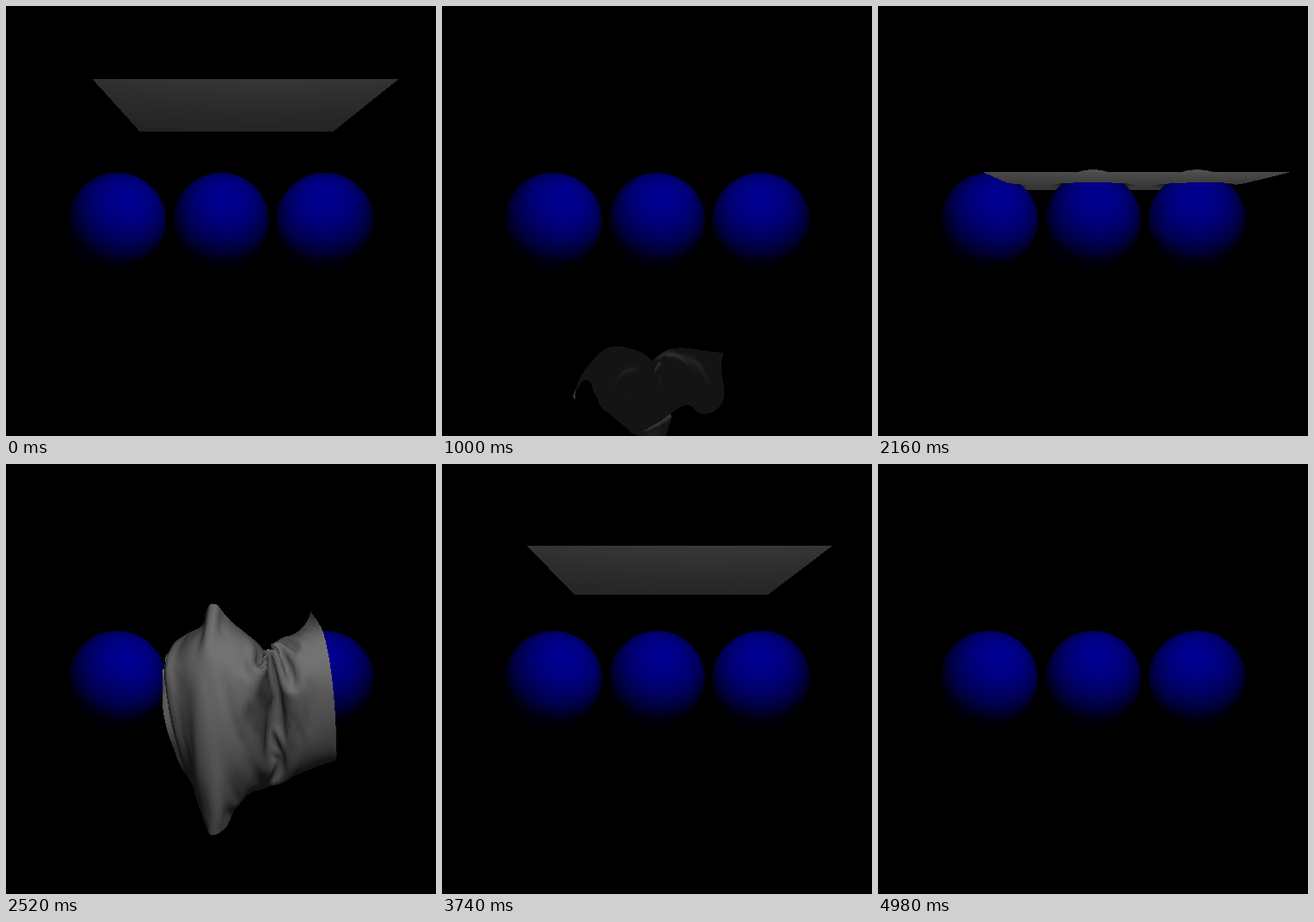
Animation of 500 by 500 pixels, one loop 5440 ms. Source, as an HTML page with a canvas:

```html
<!DOCTYPE html>
<html>
<head>
<meta charset="utf-8">
<style>
html, body { margin: 0; width: 100%; height: 100%; overflow: hidden; background: #000; }
canvas { display: block; width: 100vw; height: 100vh; }
</style>
</head>
<body>
<canvas id="stage" width="500" height="500"></canvas>
<script>
// A square cloth of side 1 is dropped on three balls, once per offset.
// Space: x right, y up, z away from a camera at the origin.
const SIZE = 500, FOCAL = 603;
const LOOP = 5440, DROP = 1820, STEP = 20, FALL_TIME = 1380;
const OFFSETS = [0.080, 0.142, 0.074];
const START_Y = 0.4635, NEAR_Z = 1.694;
const BALL_Z = 2.35, BALL_R = 0.2174, BALL_X = [-0.4677, 0, 0.4677];
const SKIN_R = 0.232;
const LIGHT = [0.17, 0.77, 0.9];

const N = 52, GAP = 1 / (N - 1);
const SUBSTEPS = 5, ITERATIONS = 6, DAMPING = 0.9995;
const GRAVITY = 5.28 * (STEP / 1000 / SUBSTEPS) ** 2;
// Springs to neighbours: columns, rows, stiffness
const SPRINGS = [[1, 0, 1], [0, 1, 1], [1, 1, 0.4], [-1, 1, 0.4], [2, 0, 0.04], [0, 2, 0.04]];

const ctx = document.getElementById('stage').getContext('2d');
const image = ctx.createImageData(SIZE, SIZE);
const pixels = new Uint32Array(image.data.buffer);
const nearness = new Float32Array(SIZE * SIZE);
const ballPixels = new Uint32Array(SIZE * SIZE).fill(0xff000000);
const ballNearness = new Float32Array(SIZE * SIZE);

const pos = new Float64Array(N * N * 3), prev = new Float64Array(N * N * 3);

// Lambert light on a point with a normal of any length
function lambert(x, y, z, nx, ny, nz) {
  const lx = LIGHT[0] - x, ly = LIGHT[1] - y, lz = LIGHT[2] - z;
  const dot = nx * lx + ny * ly + nz * lz;
  return Math.max(0, dot / (Math.hypot(lx, ly, lz) * Math.hypot(nx, ny, nz) || 1));
}

function traceBalls() {
  for (let i = 0; i < SIZE * SIZE; i++) {
    const dx = (i % SIZE + 0.5 - SIZE / 2) / FOCAL;
    const dy = (SIZE / 2 - Math.floor(i / SIZE) - 0.5) / FOCAL;
    const dd = dx * dx + dy * dy + 1;
    for (const cx of BALL_X) {
      const b = dx * cx + BALL_Z;
      const disc = b * b - dd * (cx * cx + BALL_Z ** 2 - BALL_R ** 2);
      if (disc < 0) continue;
      const z = (b - Math.sqrt(disc)) / dd, x = dx * z, y = dy * z;
      const blue = 10 + 135 * lambert(x, y, z, x - cx, y, z - BALL_Z);
      ballPixels[i] = 0xff000000 | blue << 16;
      ballNearness[i] = 1 / z;
    }
  }
}

function resetCloth(offset) {
  for (let row = 0, k = 0; row < N; row++) for (let col = 0; col < N; col++, k += 3) {
    pos[k] = offset - 0.5 + col * GAP;
    pos[k + 1] = START_Y;
    pos[k + 2] = NEAR_Z + row * GAP;
  }
  prev.set(pos);
}

function relax(dCol, dRow, stiffness) {
  const rest = Math.hypot(dCol, dRow) * GAP, jump = (dRow * N + dCol) * 3;
  const first = Math.max(0, -dCol), last = N - Math.max(0, dCol);
  for (let row = 0; row < N - dRow; row++) for (let col = first; col < last; col++) {
    const a = (row * N + col) * 3, b = a + jump;
    const x = pos[b] - pos[a], y = pos[b + 1] - pos[a + 1], z = pos[b + 2] - pos[a + 2];
    const length = Math.sqrt(x * x + y * y + z * z) || rest;
    const pull = 0.5 * stiffness * (1 - rest / length);
    pos[a] += x * pull; pos[a + 1] += y * pull; pos[a + 2] += z * pull;
    pos[b] -= x * pull; pos[b + 1] -= y * pull; pos[b + 2] -= z * pull;
  }
}

function pushOutOfBalls() {
  for (let k = 0; k < pos.length; k += 3) for (const cx of BALL_X) {
    const x = pos[k] - cx, y = pos[k + 1], z = pos[k + 2] - BALL_Z;
    const dist2 = x * x + y * y + z * z;
    if (dist2 >= SKIN_R * SKIN_R) continue;
    const grow = SKIN_R / Math.sqrt(dist2);
    pos[k] = cx + x * grow;
    pos[k + 1] = y * grow;
    pos[k + 2] = BALL_Z + z * grow;
  }
}

function stepCloth() {
  for (let s = 0; s < SUBSTEPS; s++) {
    for (let k = 0; k < pos.length; k++) {
      const now = pos[k];
      pos[k] += (now - prev[k]) * DAMPING - (k % 3 === 1 ? GRAVITY : 0);
      prev[k] = now;
    }
    for (let i = 0; i < ITERATIONS; i++) {
      for (const spring of SPRINGS) relax(...spring);
      pushOutOfBalls();
    }
  }
}

// Screen place, nearness and grey level of one cloth point
function project(row, col) {
  const at = (r, c) => (Math.max(0, Math.min(N - 1, r)) * N + Math.max(0, Math.min(N - 1, c))) * 3;
  const k = at(row, col), x = pos[k], y = pos[k + 1], z = pos[k + 2];
  const across = [0, 1, 2].map(i => pos[at(row, col + 1) + i] - pos[at(row, col - 1) + i]);
  const along = [0, 1, 2].map(i => pos[at(row + 1, col) + i] - pos[at(row - 1, col) + i]);
  const nx = along[1] * across[2] - along[2] * across[1];
  const ny = along[2] * across[0] - along[0] * across[2];
  const nz = along[0] * across[1] - along[1] * across[0];
  return {
    x: SIZE / 2 + FOCAL * x / z,
    y: SIZE / 2 - FOCAL * y / z,
    near: 1 / z,
    grey: 20 + 95 * lambert(x, y, z, nx, ny, nz)
  };
}

function fillTriangle(a, b, c) {
  const area = (b.x - a.x) * (c.y - a.y) - (b.y - a.y) * (c.x - a.x);
  if (!area) return;
  const left = Math.max(0, Math.floor(Math.min(a.x, b.x, c.x)));
  const right = Math.min(SIZE - 1, Math.ceil(Math.max(a.x, b.x, c.x)));
  const top = Math.max(0, Math.floor(Math.min(a.y, b.y, c.y)));
  const bottom = Math.min(SIZE - 1, Math.ceil(Math.max(a.y, b.y, c.y)));
  for (let y = top; y <= bottom; y++) for (let x = left; x <= right; x++) {
    const px = x + 0.5 - a.x, py = y + 0.5 - a.y;
    const v = (px * (c.y - a.y) - py * (c.x - a.x)) / area;
    const w = (py * (b.x - a.x) - px * (b.y - a.y)) / area;
    const u = 1 - v - w;
    if (u < 0 || v < 0 || w < 0) continue;
    const near = u * a.near + v * b.near + w * c.near, i = y * SIZE + x;
    if (near <= nearness[i]) continue;
    nearness[i] = near;
    pixels[i] = 0xff000000 | Math.round(u * a.grey + v * b.grey + w * c.grey) * 0x010101;
  }
}

function drawCloth() {
  const points = Array.from({ length: N * N }, (_, k) => project(Math.floor(k / N), k % N));
  for (let row = 0; row < N - 1; row++) for (let col = 0; col < N - 1; col++) {
    const k = row * N + col;
    fillTriangle(points[k], points[k + 1], points[k + N]);
    fillTriangle(points[k + 1], points[k + N + 1], points[k + N]);
  }
}

let drop = -1, done = 0;
function draw(now) {
  const time = Math.floor(now % LOOP / STEP) * STEP;
  const index = Math.floor(time / DROP), t = time % DROP;
  pixels.set(ballPixels);
  nearness.set(ballNearness);
  if (t < FALL_TIME) {
    if (index !== drop || t / STEP < done) {
      drop = index;
      done = 0;
      resetCloth(OFFSETS[index]);
    }
    for (; done < t / STEP; done++) stepCloth();
    drawCloth();
  }
  ctx.putImageData(image, 0, 0);
}

traceBalls();
const start = performance.now();
function tick() {
  draw(performance.now() - start);
  requestAnimationFrame(tick);
}
tick();
</script>
</body>
</html>
```
